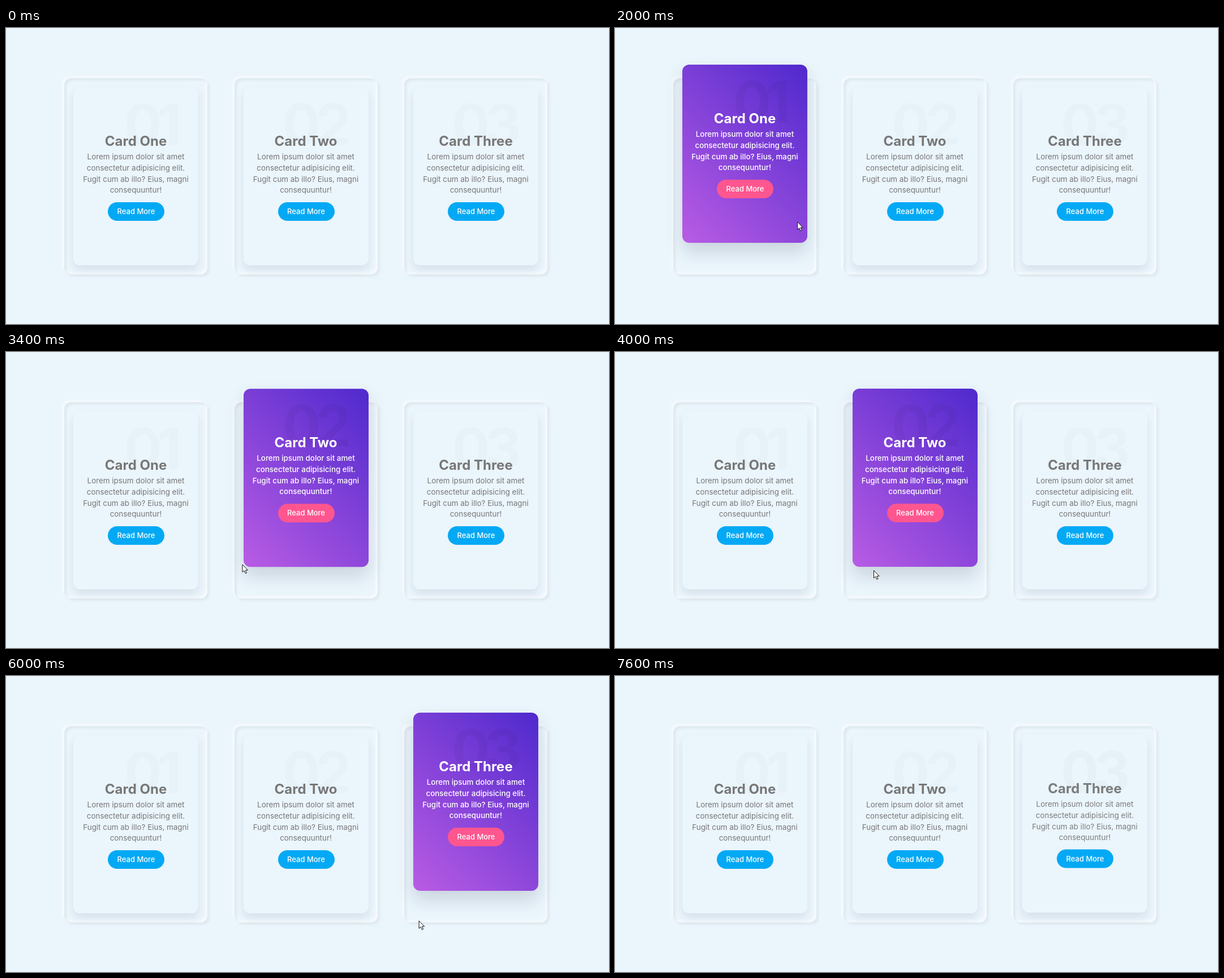
Write an HTML page that moves like this. It is 1066 px wide and 525 px high and loops after 7.8 s.

```html
<!DOCTYPE html>
<html lang="en">
<head>
<meta charset="utf-8">
<title>Hover cards</title>
<style>
  html, body { margin: 0; width: 100%; height: 100%; overflow: hidden; }
  body { position: relative; background: #ebf5fc; font-family: Inter, sans-serif; }
  .box {
    position: absolute; top: 89px; width: 253px; height: 347.5px; border-radius: 12px;
    box-shadow: inset 4px 4px 4px rgba(0,0,0,.05), inset -4px -4px 4px rgba(255,255,255,.5),
      4px 4px 4px rgba(0,0,0,.05), -4px -4px 4px rgba(255,255,255,.5);
  }
  .card {
    position: absolute; left: 16px; top: 16px; width: 221px; height: 316px;
    border-radius: 12px; text-align: center; white-space: nowrap;
  }
  .card > * { position: absolute; margin: 0; left: 0; right: 0; }
  h2 { top: 16px; font: 700 100px/1 Inter, sans-serif; letter-spacing: -.09em; text-align: right; padding-right: 39px; }
  h3 { top: 81px; font: 700 24px/30px Inter, sans-serif; }
  p { top: 114px; font-size: 13.4px; line-height: 19.75px; }
  .card .button {
    top: 204px; left: 61px; width: 100px; border-radius: 17px;
    color: #fff; font-weight: 500; font-size: 13px; line-height: 33px;
  }
  #cursor { position: absolute; left: 0; top: 0; overflow: visible; }
</style>
</head>
<body>
<svg id="cursor" width="12" height="18">
  <path d="M.5 .5V14L3.6 11.2L5.8 16.2L8 15.2L5.9 10.4H10Z" fill="#fff" stroke="#111" stroke-linejoin="round"/>
</svg>
<script>
const LOOP = 7800, STEP = 200, TRANSITION = 500, LIFT = 40;
const hovers = [
  { name: 'One', enter: 270, leave: 2620 },
  { name: 'Two', enter: 2960, leave: 4950 },
  { name: 'Three', enter: 5420, leave: 7220 },
];
// The pointer rests briefly at each stop and glides between them.
const stops = [
  { time: 200, x: 76, y: 392 },
  { time: 1000, x: 244, y: 312 },
  { time: 2800, x: 378, y: 366 },
  { time: 4000, x: 457, y: 387 },
  { time: 4600, x: 464, y: 390 },
  { time: 5200, x: 710, y: 460 },
  { time: 7000, x: 757, y: 397 },
  { time: 7400, x: 744, y: 460 },
];
const cursor = document.getElementById('cursor');

const cards = hovers.map((hover, i) => {
  const box = document.createElement('div');
  box.className = 'box';
  box.style.left = 103 + 300.5 * i + 'px';
  box.innerHTML = `<div class="card"><h2>0${i + 1}</h2><h3>Card ${hover.name}</h3>
    <p>Lorem ipsum dolor sit amet<br>consectetur adipisicing elit.<br>Fugit cum ab illo? Eius, magni<br>consequuntur!</p>
    <div class="button">Read More</div></div>`;
  document.body.insertBefore(box, cursor);
  const find = selector => box.querySelector(selector);
  return { ...hover, root: find('.card'), number: find('h2'), text: find('p'), button: find('.button') };
});

const mix = (a, b, k) => a + (b - a) * k;
const smooth = k => k * k * (3 - 2 * k);

// cubic-bezier(.25, .1, .25, 1)
function ease(x) {
  if (x <= 0) return 0;
  if (x >= 1) return 1;
  const curve = (u, a, b) => 3 * u * (1 - u) ** 2 * a + 3 * u * u * (1 - u) * b + u ** 3;
  let low = 0, high = 1;
  for (let i = 0; i < 24; i++) {
    const mid = (low + high) / 2;
    if (curve(mid, .25, .25) < x) low = mid; else high = mid;
  }
  return curve(low, .1, 1);
}

function drawCard({ enter, leave, root, number, text, button }, t) {
  const lift = ease((t - enter) / TRANSITION) - ease((t - leave) / TRANSITION);
  const hovered = t >= enter && t < leave;
  const gray = mix(119, 255, lift);
  root.style.transform = `translateY(${-LIFT * lift}px)`;
  root.style.color = `rgb(${gray}, ${gray}, ${gray})`;
  root.style.background = hovered
    ? 'linear-gradient(45deg, #b95ce4, #4f29cd)'
    : `rgba(235, 245, 252, ${1 - lift})`;
  root.style.boxShadow = `0 ${mix(8, 16, lift)}px ${mix(16, 32, lift)}px rgba(10, 20, 50, ${mix(.09, .15, lift)})`;
  number.style.color = `rgba(0, 0, 0, ${mix(.017, .04, lift)})`;
  text.style.fontWeight = hovered ? 500 : 400;
  button.style.background = hovered ? '#ff568f' : '#03a9f4';
}

function drawCursor(t) {
  const next = stops.findIndex(stop => stop.time > t);
  const from = stops.at(next - 1), to = stops.at(next);
  const visible = t >= stops[0].time && t <= stops.at(-1).time;
  cursor.style.display = visible ? 'block' : 'none';
  const k = from === to || next < 0 ? 1 : smooth((t - from.time) / (to.time - from.time));
  cursor.style.transform = `translate(${mix(from.x, to.x, k)}px, ${mix(from.y, to.y, k)}px)`;
}

const start = performance.now();
function draw() {
  const elapsed = (performance.now() - start) % LOOP;
  const t = Math.floor(elapsed / STEP) * STEP;
  cards.forEach(card => drawCard(card, t));
  drawCursor(t);
  requestAnimationFrame(draw);
}
draw();
</script>
</body>
</html>
```
